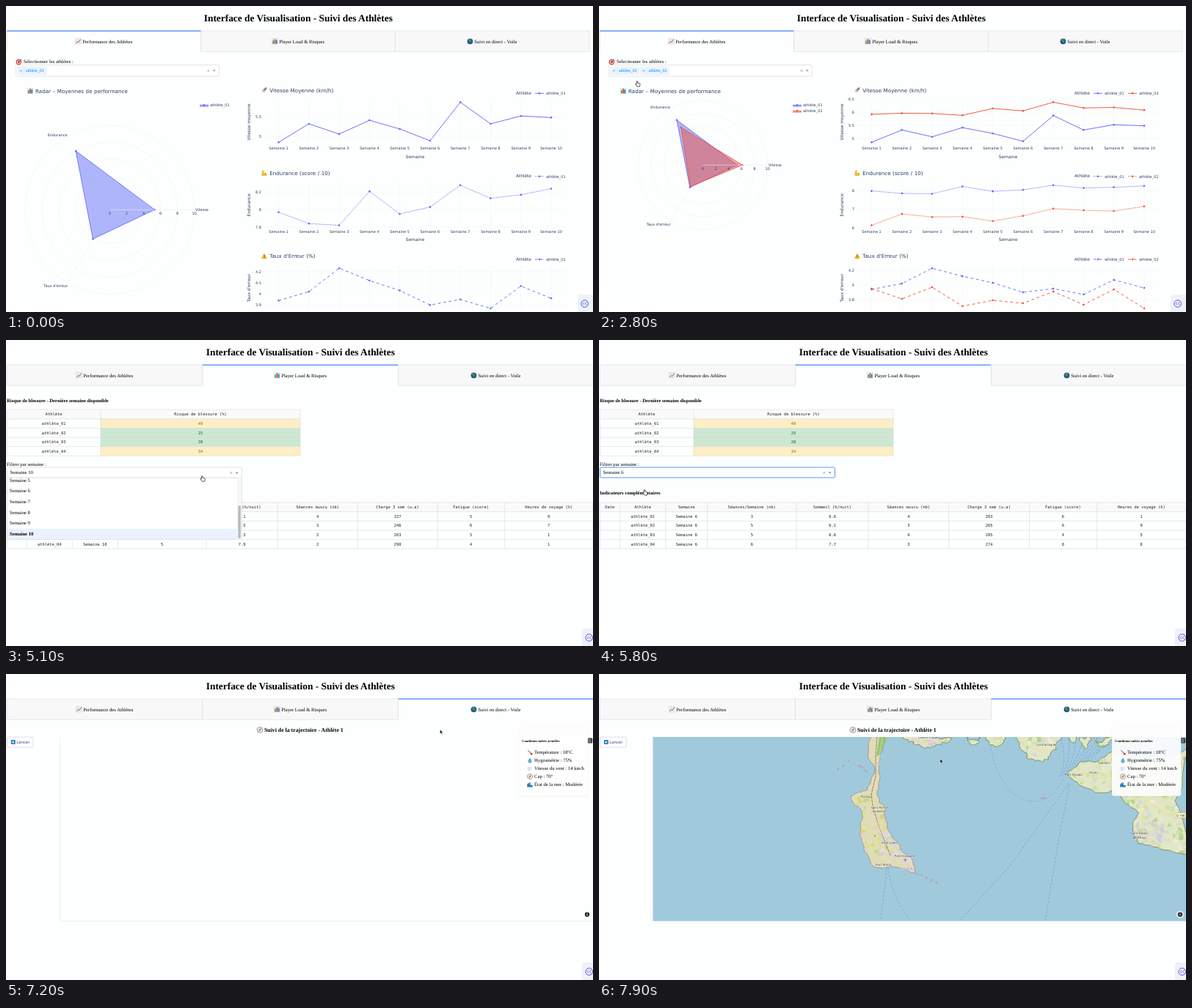
Animation of 800x418 px, one loop 8 s. Source, as an HTML page:

```html
<!DOCTYPE html>
<html lang="fr">
<head>
<meta charset="utf-8">
<title>Suivi des Athlètes</title>
<style>
html,body{margin:0;width:100%;height:100%;overflow:hidden;background:#fdfefe}
svg{display:block;width:100vw;height:100vh}
text{white-space:pre;text-rendering:geometricPrecision}
.s{font:6.667px "Liberation Serif",Times,serif;fill:#000}
.b{font-weight:bold}
.h{font-size:13.38px}
.h3{font-size:7.8px}
.chip{font-size:6px;fill:#007eff}
.tiny{font-size:4.5px}
.p{font:5px "DejaVu Sans",Verdana,sans-serif;fill:#2a3f5f}
.p6{font-size:5.83px}
.p7{font-size:7.15px;word-spacing:.3px}
.m{font:5.42px "DejaVu Sans Mono",Menlo,monospace;fill:#222}
.map{font:4.3px "Noto Sans","Open Sans",sans-serif;fill:#3a3a3a;paint-order:stroke;stroke:#fff;stroke-opacity:.6;stroke-width:.8}
</style>
</head>
<body>
<svg id="stage" viewBox="0 0 800 418" preserveAspectRatio="none"></svg>
<script>
const BLUE = '#636efa', RED = '#ef553b', BG = '#fdfefe', COLORS = [BLUE, RED];
const ANCHOR = { s: 'start', m: 'middle', e: 'end' };

const text = (x, y, s, cls = 's', a = 's', extra = '') =>
  `<text x="${x}" y="${y}" class="${cls}" text-anchor="${ANCHOR[a]}" ${extra}>${s}</text>`;
const rect = (x, y, w, h, fill, extra = '') =>
  `<rect x="${x}" y="${y}" width="${w}" height="${h}" fill="${fill}" ${extra}/>`;
const path = (d, fill = 'none', stroke = 'none', w = 1, extra = '') =>
  `<path d="${d}" fill="${fill}" stroke="${stroke}" stroke-width="${w}" ${extra}/>`;
const circle = (x, y, r, fill, extra = '') =>
  `<circle cx="${x}" cy="${y}" r="${r}" fill="${fill}" ${extra}/>`;
const group = (id, body, extra = '') => `<g id="${id}" ${extra}>${body}</g>`;
const poly = pts => 'M' + pts.map(p => p.map(v => +v.toFixed(2)).join(' ')).join('L');
const stroke = (c, w = .5) => `stroke="${c}" stroke-width="${w}"`;
const times = (n, f) => Array.from({ length: n }, (_, i) => f(i));
const random = seed => () => (seed = seed * 16807 % 2147483647) / 2147483647;

// pictograms in an 8 x 8 box
const ICONS = {
  bars: rect(.2, .3, 7.6, 7.4, '#e9eef2', stroke('#b8c4cc', .4)) + rect(1, 3, 1.7, 4.4, '#3aa655') +
    rect(3.2, 1, 1.7, 6.4, '#d8453e') + rect(5.4, 2.2, 1.7, 5.2, '#2f6fc4'),
  up: rect(.2, .3, 7.6, 7.4, '#eef1f4', stroke('#b8c4cc', .4)) +
    path('M1 3H7M1 5H7M3 1V7M5 1V7', 'none', '#c3d3df', .3) + path('M.8 6.8L3 4.2L4.5 5.2L7.2 1.2', 'none', '#d83c3c', .9),
  globe: circle(4, 4, 3.9, '#1d4f9e') + path('M2 1.2Q5 .2 5.6 1.6L4.6 3L5.6 4L4.4 6.9L3.2 4.6L1.2 3.6Z', '#4f8f45') + path('M6 3L7.6 3.4L6.8 5.6Z', '#4f8f45'),
  target: circle(3.8, 4.2, 3.7, '#c9352f') + circle(3.8, 4.2, 2.6, '#f3e9e4') + circle(3.8, 4.2, 1.6, '#c9352f') +
    path('M3.8 4.2L7.6 .6', 'none', '#444', .8),
  rocket: path('M7.8 .3Q4 .5 2.2 4L4 5.9Q7.6 4 7.8 .3Z', '#8b98a6') + path('M2.4 3.4L.6 4.4L2 4.8ZM4.6 5.6L3.7 7.5L3.2 6Z', '#d43c34') +
    path('M2 5L.4 7.7L3 6Z', '#f6a623') + circle(5.4, 2.7, .8, '#3a6ea8'),
  arm: path('M1.4 .8L3.4 .5L3.7 2L2.6 2.6L3 4.4Q5 2.8 6.8 4.2Q8.2 6 6.8 7.4Q3.4 8.2 .5 7Z', '#f4bd2f', '#d99a1f', .3),
  warn: path('M4 .5L7.8 7.3H.2Z', '#f8c22e', '#e0a21b', .4) + rect(3.6, 2.8, .8, 2.5, '#222') + circle(4, 6.3, .5, '#222'),
  compass: circle(4, 4, 3.6, '#e9e9e7', stroke('#8a8a8a', .7)) + path('M6 1.8L4.6 4.6L3.4 3.4Z', '#d0402f') + path('M2 6.2L4.6 4.6L3.4 3.4Z', '#777'),
  play: rect(.3, .3, 7.4, 7.4, '#3b82c4', 'rx="1"') + path('M2.8 2L6 4L2.8 6Z', '#fff'),
  thermo: path('M1.4 1L6 5.6', 'none', '#c9b9b9', 1.6, 'stroke-linecap="round"') + path('M2.6 2.2L6 5.6', 'none', '#9c3a34', .8) + circle(6.3, 6, 1.3, '#b5342d'),
  drop: path('M4 .3Q7 4 6.6 5.6A2.7 2.7 0 0 1 1.4 5.6Q1 4 4 .3Z', '#5aaee0'),
  wind: path('M.6 3H5Q6.6 3 6 1.6M.6 4.8H6.6M1.6 6.4H4.6', 'none', '#b9c7d4', .8) + circle(1.8, 2.6, 1, '#d7dde6'),
  wave: path('M.2 7.4V3.6Q2.6 -.4 6.2 2.2L4.4 3Q4.4 5 7.8 5V7.4Z', '#2f7fb8') + path('M.6 3.4Q3 .6 6 2.3', 'none', '#bfe0ee', .7)
};
const icon = (name, x, y, k = 1) => `<g transform="translate(${x} ${y}) scale(${k})">${ICONS[name]}</g>`;

function tabs(sel, w) {
  const items = [['up', 'Performance des Athlètes', 39], ['bars', 'Player Load &amp; Risques', 35.7], ['globe', 'Suivi en direct - Voile', 34.2]];
  let out = text(1.4 + w * 1.5, 21, 'Interface de Visualisation - Suivi des Athlètes', 's b h', 'm');
  items.forEach(([ic, label, off], i) => {
    const x = 1.2 + w * i, c = x + w / 2, on = i === sel;
    out += rect(x, 34, w, 28.2, on ? BG : '#f8f8f8', on ? '' : stroke('#d6d6d6'));
    if (on) out += path(`M${x} 34V62M${x + w} 34V62`, 'none', '#d6d6d6', .5) + rect(x, 33.5, w, 1.2, '#3f7dfa');
    out += icon(ic, c - off, 44.3) + text(c - off + 9.8, 51, label);
  });
  return out;
}

function sideButton(x) {
  return path(`M800 394H${x + 3}Q${x} 394 ${x} 397V418H800Z`, '#eff1fa') +
    circle(x + 9.7, 406.6, 4.8, 'none', stroke('#4540d6', .9)) +
    path(`M${x + 9.2} 404.6l-2 2l2 2m3.2 -4l-2 2l2 2`, 'none', '#4540d6', .8);
}

const cross = (x, y, r, c, w = .6) => path(`M${x - r} ${y - r}l${2 * r} ${2 * r}m0 ${-2 * r}l${-2 * r} ${2 * r}`, 'none', c, w);
const caret = (x, y, up) => path(up ? `M${x - 2} ${y + 1}h4l-2 -2.2Z` : `M${x - 2} ${y - 1}h4l-2 2.2Z`, '#888');

function chip(i) {
  const x = 16.4 + 40.5 * i;
  return rect(x, 83.2, 38, 10.4, '#ebf5ff', 'rx=".8" ' + stroke('#c2e0ff', .4)) + path(`M${x + 8} 83.2v10.4`, 'none', '#c2e0ff', .4) +
    cross(x + 4, 88.4, 1.1, '#007eff') + text(x + 10.6, 90.4, 'athlète_0' + (i + 1), 's chip');
}

// performance tab
const CHARTS = [
  { ic: 'rocket', title: 'Vitesse Moyenne (km/h)', yTitle: 'Vitesse moyenne', dash: 0,
    data: [[4.85, 5.32, 5.06, 5.41, 5.19, 4.89, 5.87, 5.32, 5.52, 5.48], [5.92, 5.96, 5.95, 5.88, 6.14, 6.05, 6.38, 6.16, 6.18, 6.08]] },
  { ic: 'arm', title: 'Endurance (score / 10)', yTitle: 'Endurance', dash: 1.25,
    data: [[7.97, 7.84, 7.82, 8.21, 7.95, 8.03, 8.28, 8.13, 8.17, 8.24], [6.12, 6.73, 6.57, 6.59, 6.35, 6.63, 7.02, 6.93, 6.89, 7.14]] },
  { ic: 'warn', title: "Taux d'Erreur (%)", yTitle: "Taux d'erreur", dash: 3.75,
    data: [[3.94, 4.02, 4.23, 4.12, 4.03, 3.9, 3.95, 3.87, 4.07, 3.96], [3.95, 3.81, 3.97, 3.71, 3.79, 3.75, 3.91, 3.73, 3.94, 3.68]] }
];
const weekX = i => 371.5 + 41.28 * i;

function chart(c, row, n) {
  const dy = row * 113.4, all = c.data.slice(0, n).flat();
  const max = Math.max(...all), span = max - Math.min(...all), pad = span * .1;
  const Y = v => 131.4 + dy + (max - v) / span * 54.8;
  const step = [.1, .2, .5, 1].find(s => span / s < 3.8);
  const dash = (c.dash ? `stroke-dasharray="${c.dash}" ` : '') + 'stroke-linejoin="round"';
  let out = icon(c.ic, 348, 110.8 + dy) + text(359.3, 117.6 + dy, c.title, 'p p7');
  for (let i = 0; i < 10; i++) {
    out += path(`M${weekX(i)} ${128 + dy}v60`, 'none', '#eef2f9', .5) + text(weekX(i), 196.4 + dy, 'Semaine ' + (i + 1), 'p', 'm');
  }
  for (let k = Math.ceil((max - span - pad) / step); k * step < max + pad; k++) {
    const v = +(k * step).toFixed(1);
    out += path(`M351 ${Y(v)}H764`, 'none', '#eef2f9', .5) + text(348, Y(v) + 1.9, v, 'p', 'e');
  }
  out += text(557.5, 207.7 + dy, 'Semaine', 'p p6', 'm') +
    text(0, 0, c.yTitle, 'p p6', 'm', `transform="translate(333 ${158.5 + dy}) rotate(-90)"`) +
    text(695 - 47 * (n - 1), 121 + dy, 'Athlète', 'p p6');
  for (let s = 0; s < n; s++) {
    const pts = c.data[s].map((v, i) => [weekX(i), Y(v)]), lx = 736 - 47 * (n - 1 - s), ly = 119.3 + dy;
    out += path(poly(pts), 'none', COLORS[s], .95, dash) + pts.map(p => circle(p[0], p[1], 1.3, COLORS[s])).join('') +
      path(`M${lx - 15} ${ly}h12`, 'none', COLORS[s], .95, dash) + circle(lx - 9, ly, 1.3, COLORS[s]) +
      text(lx, ly + 1.9, 'athlète_0' + (s + 1), 'p');
  }
  return out;
}

function radar(n) {
  const cx = 141.5, [cy, R] = n === 1 ? [278.3, 115.2] : [217.2, 88.2];
  const at = (r, deg) => [cx + r * R / 10 * Math.cos(deg * Math.PI / 180), cy - r * R / 10 * Math.sin(deg * Math.PI / 180)];
  const means = [[5.3, 8.05, 4], [6.1, 6.7, 3.85]];
  let out = icon('bars', 29, 112) + text(40, 118.7, 'Radar – Moyennes de performance', 'p p7');
  for (let r = 2; r <= 10; r += 2) out += circle(cx, cy, r * R / 10, 'none', stroke('#ebf0f8'));
  for (const a of [120, 240]) out += path(poly([[cx, cy], at(10, a)]), 'none', '#ebf0f8', .5);
  for (let s = 0; s < n; s++) {
    const pts = means[s].map((r, i) => at(r, 120 * i)), c = COLORS[s], y = 135.4 + 7.9 * s;
    out += path(poly(pts) + 'Z', c, 'none', 0, 'fill-opacity=".5"') + path(poly(pts) + 'Z', 'none', c, .9) +
      pts.map(p => circle(p[0], p[1], 1.3, c)).join('') +
      rect(264, y, 12, 2.6, c, 'opacity=".5"') + path(`M264 ${y}h12`, 'none', c, .9) + circle(270, y, 1.3, c) +
      text(278, y + 1.8, 'athlète_0' + (s + 1), 'p');
  }
  out += path(`M${cx} ${cy}h${R}`, 'none', '#e3e9f3', .6);
  for (let r = 0; r <= 10; r += 2) out += text(cx + r * R / 10, cy + 6.3, r, 'p', 'm');
  return out + text(cx + R + 1.2, cy + 1.8, 'Vitesse', 'p') +
    text(cx - R / 2 - .4, cy - R * .866 - .8, 'Endurance', 'p', 'e') +
    text(cx - R / 2 + .2, cy + R * .866 + 6.2, "Taux d'erreur", 'p', 'e');
}

const dashboard = n => radar(n) + CHARTS.map((c, i) => chart(c, i, n)).join('');

const athletePicker = icon('target', 13.5, 72.3) + text(24, 78.3, 'Sélectionner les athlètes :') +
  rect(13.7, 80.6, 276.6, 15.4, '#fff', 'rx="1.5" ' + stroke('#c8c8c8')) + chip(0) + group('chip2', chip(1)) +
  cross(276, 88.4, 1.5, '#888') + group('down1', caret(283.7, 88.4)) + group('up1', caret(283.7, 88.4, true));

const athleteMenu = rect(13.7, 96, 461, 44, '#fff', stroke('#ccc')) + rect(14, 96.2, 460.4, 14.4, '#ebf1fd') +
  times(3, i => text(17.8, 105.4 + 14.7 * i, 'athlète_0' + (i + 2))).join('');

// load and risk tab
function table(xs, y, head, rows, fills = []) {
  const h = 12.6, w = xs[xs.length - 1] - xs[0];
  let out = rect(xs[0], y, w, h, '#fafafa');
  [head, ...rows].forEach((cells, r) => {
    if (fills[r - 1]) out += rect(xs[1], y + r * h, xs[2] - xs[1], h, fills[r - 1][0]);
    cells.forEach((s, i) => {
      const tint = r && i && fills[r - 1] ? `style="fill:${fills[r - 1][1]}"` : '';
      out += text((xs[i] + xs[i + 1]) / 2, y + r * h + 8.1, s, 'm', 'm', tint);
    });
  });
  for (let r = 0; r <= rows.length + 1; r++) out += path(`M${xs[0]} ${y + r * h}h${w}`, 'none', '#d3d3d3', .5);
  return out + xs.map(x => path(`M${x} ${y}v${h * (rows.length + 1)}`, 'none', '#d3d3d3', .5)).join('');
}

const AMBER = ['#fdeec5', '#8a6a14'], GREEN = ['#cce8d2', '#1f5c31'];
const risks = text(1, 84.5, 'Risque de blessure - Dernière semaine disponible', 's b') +
  table([1.3, 129, 401], 95.2, ['Athlète', 'Risque de blessure (%)'],
    [49, 25, 28, 34].map((v, i) => ['athlète_0' + (i + 1), v]), [AMBER, GREEN, GREEN, AMBER]);

function indicators(week, rows) {
  const head = ['Date', 'Athlète', 'Semaine', 'Séances/Semaine (nb)', 'Sommeil (h/nuit)', 'Séances muscu (nb)', 'Charge 3 sem (u.a)', 'Fatigue (score)', 'Heures de voyage (h)'];
  const body = rows.map((r, i) => ['', 'athlète_0' + (i + 1), 'Semaine ' + week, ...r.split(' ')]);
  // column widths follow the longest cell
  const sizes = head.map((s, i) => Math.max(s.length, body[0][i].length) + .6);
  const k = 798.7 / sizes.reduce((a, b) => a + b), xs = [1.3];
  sizes.forEach(n => xs.push(xs[xs.length - 1] + n * k));
  return text(1, 211.3, 'Indicateurs complémentaires', 's b') + table(xs, 222, head, body);
}
const picker = week => text(5.6, 183.3, 'Semaine ' + week);
const week10 = indicators(10, ['4 6.1 4 327 5 9', '3 7.5 3 246 6 7', '6 6.3 2 203 5 1', '5 7.9 2 298 4 1']);
const week6 = indicators(6, ['3 6.6 4 203 6 1', '5 6.1 3 265 6 9', '5 6.6 4 285 4 5', '6 7.7 3 274 8 8']);

const weekPicker = text(1, 172, 'Filtrer par semaine :') +
  rect(1.5, 174, 320, 14, '#fff', 'id="box2" rx="1.5" ' + stroke('#c8c8c8')) +
  cross(306.8, 181.4, 1.5, '#888') + group('down2', caret(314.7, 181.2)) + group('up2', caret(314.7, 181.2, true)) +
  group('pick10', picker(10)) + group('pick6', picker(6));

const weekMenu = rect(1.5, 188.2, 320, 84.3, '#fff', stroke('#ccc')) + rect(1.8, 257.8, 313, 14.4, '#ebf1fd') +
  rect(1.8, 199.2, 313, 14.4, '#ebf1fd', 'id="hover6"') +
  times(6, i => text(5, 193.8 + 14.66 * i, 'Semaine ' + (i + 5), i === 5 ? 's b' : 's')).join('') +
  rect(315, 188.5, 6.2, 83.8, '#f6f6f6') + rect(316.4, 226, 3.4, 45, '#b9b9b9', 'rx="1.7"');

// live map tab
const rnd = random(11);

// closed outline through key points, roughened by midpoint displacement
function coast(pts, rough = .3, levels = 3) {
  for (let l = 0; l < levels; l++) {
    pts = pts.flatMap(([x, y], i) => {
      const [x2, y2] = pts[(i + 1) % pts.length], k = (rnd() - .5) * rough;
      return [[x, y], [(x + x2) / 2 + (y2 - y) * k, (y + y2) / 2 - (x2 - x) * k]];
    });
  }
  return poly(pts) + 'Z';
}
const keys = s => s.split(' ').map(p => p.split(',').map(Number));
// land hanging from the upper edge of the map
const bay = ([x, w, depth]) => coast(times(9, i => [x + w * i / 8, 85 + depth * Math.sin(Math.PI * i / 8) ** .6]), .8, 2);

const QUIBERON = coast(keys('373,84 376,130 366,158 343,167 355,183 357,210 361,240 376,264 406,264 431,271 428,256 411,240 393,205 379,165 381,130 386,105 398,84'), .32);
const RHUYS = coast(keys('637,137 656,120 700,106 806,98 806,248 765,239 735,232 727,205 735,189 700,159 655,152'), .3);
const NORTH = [[414, 70, 15], [500, 20, 12], [529, 26, 14], [567, 64, 33], [640, 12, 9], [657, 12, 17], [674, 24, 14], [702, 30, 10]].map(bay).join('');

function fields(x, y, w, h, n, tones) {
  return times(n, () => {
    const cx = x + rnd() * w, cy = y + rnd() * h;
    return path(coast(times(4, i => {
      const a = i * Math.PI / 2 + rnd(), r = 1.5 + rnd() * 4;
      return [cx + r * Math.cos(a), cy + r * Math.sin(a)];
    }), .5, 1), tones[Math.floor(rnd() * tones.length)]);
  }).join('');
}
const TOWN = ['#d9d5d8', '#d2cfd4', '#e2dcdc'], MEADOW = ['#cfe0a8', '#b4d58f', '#e3e8c6', '#d8e3b4', '#dad7d6', '#eeebd6'], HEATH = ['#dbe08f', '#c6d888', '#e9dfa0', '#d9d5d8', '#e3d3b8'];

const ferry = (d, o = 1) => path(d, 'none', '#7c8ee0', .7, `stroke-dasharray="3 2" opacity="${o}"`);
const LABELS = [[448, 88, 'Carnac-Plage'], [363.5, 169, 'Portivy'], [382, 184, 'Saint Pierre'], [382, 189.3, 'Quiberon'], [396, 232, 'Saint Julien'],
  [416.5, 250.3, 'Port Haliguen'], [387.5, 261.8, 'Port Maria'], [610, 97.8, 'Locmariaquer'], [689, 123, 'Kerners'], [674, 136, 'Arzon'],
  [647, 139, 'Port-Navalo'], [737, 219, 'Saint-Gildas-'], [737, 224.5, 'de-Rhuys']];
// small rocks strung between two points
const rocks = (x, y, dx, dy, n) => times(n, i =>
  circle(x + dx * i / (n - 1), y + dy * i / (n - 1) + rnd() * 2, .8 + rnd(), '#c3b3b4', stroke('#a5849a', .4))).join('');

// tiles fade in, the nearest to the centre of the map first
const TILE = 107.6, COLS = 8;
const tileDelay = (c, r) => Math.min(13, .5 * (c - 3.3) ** 4 * (r > 1 ? 6 : 1));
const tileX = c => Math.round(18 + TILE * c), tileY = r => Math.round(82 + TILE * r);
const tileRects = times(3 * COLS, i => {
  const c = i % COLS, r = Math.floor(i / COLS);
  return rect(tileX(c), tileY(r), tileX(c + 1) - tileX(c), tileY(r + 1) - tileY(r), BG,
    `class="tile" shape-rendering="crispEdges" data-d="${tileDelay(c, r)}"`);
}).join('');

const channels = times(9, i => `M${627 + 3 * i} ${140 - i}Q${640 + 5 * i} ${118 - 2 * i} ${628 + 11 * i} 84`).join('');
const map = `<clipPath id="frame">${rect(73.5, 86, 726.5, 251.5, '#000')}</clipPath>
<clipPath id="land">${path(QUIBERON) + path(RHUYS) + path(NORTH)}</clipPath>` +
  group('map', rect(73, 86, 727, 252, '#a0cadb') +
    ferry('M393 262L384 337M394 264Q398 302 424 337') + ferry('M640 150L560 262L492 337M641 152L625 235L608 337') +
    ferry('M533 92Q537 132 560 160Q600 192 628 152L633 142', .8) + ferry(channels) +
    path(QUIBERON, '#e0ddb4') + path(RHUYS + NORTH, '#e1e6c6') +
    `<g clip-path="url(#land)">${fields(342, 162, 50, 88, 110, HEATH) + fields(384, 212, 46, 56, 70, TOWN) +
      fields(636, 100, 164, 146, 330, MEADOW) + fields(725, 200, 45, 30, 40, TOWN) + fields(412, 85, 300, 36, 200, MEADOW) + fields(420, 86, 60, 12, 30, TOWN)}` +
    path('M382 86L378 112L384 110L392 84V86Z', '#94c873') +
    path('M640 138L674 134L705 143L745 172L775 192H800M745 172L738 215L765 238M700 142L712 110', 'none', '#f1dc8a', 1.1) +
    path('M577 92L600 104L618 108M420 90L450 94L478 88', 'none', '#f4e3a6', .9) + '</g>' +
    path(QUIBERON, 'none', '#a5849a', .8) + path(RHUYS + NORTH, 'none', '#6b8352', .8) +
    path('M379 86L377 112L377 140L371 165L374 185L383 212L397 248', 'none', '#665c66', .7, 'stroke-dasharray="4 .8"') +
    path('M386 86L379 135L375 168L380 200L390 240L388 262', 'none', '#f0d9a0', .7) +
    rocks(433, 272, 27, 11, 5) + rocks(326, 130, 14, -12, 3) + rocks(355, 124, 10, 8, 4) + rocks(603, 169, 4, -1, 3) +
    circle(376, 221, 1.1, '#d77a3c') + path('M417.5 251.5v5M415 254h5', 'none', '#a44bb5', .8) +
    LABELS.map(([x, y, s]) => text(x, y, s, 'map', 'm')).join('') + text(418, 267, 'Bretagne', 'map', 'm', 'style="fill:#8d72a8"') +
    rect(785, 189.6, 15, 7, '#f7f2c4', 'rx="1" ' + stroke('#a99a4a', .4)) + text(792.5, 194.8, 'D 198', 'map', 'm') + tileRects,
    'clip-path="url(#frame)"');

const WEATHER = [['thermo', 'Température : 18°C'], ['drop', 'Hygrométrie : 75%'], ['wind', 'Vitesse du vent : 14 km/h'], ['compass', 'Cap : 70°'], ['wave', 'État de la mer : Modérée']];
const live = icon('compass', 341.6, 72, 1.1) + text(352, 79, 'Suivi de la trajectoire - Athlète 1', 's b h3') +
  rect(1.5, 86.2, 35.5, 13.8, '#fff', 'rx="1" ' + stroke('#b9bde0')) + icon('play', 6.5, 89.8, .82) +
  text(14.2, 95, 'Lancer', 'p', 's', 'style="font-size:5.4px;fill:#35408f"') + map +
  rect(792.4, 87.6, 6.8, 7, '#333', 'rx="1"') + path('M794 89.4h3.6M794 91.1h3.6M794 92.8h3.6', 'none', '#ddd', .6) +
  circle(792, 328.5, 5, '#fff', 'opacity=".75"') + circle(792, 328.5, 3.2, '#2b2b2b') + path('M792 328v2.2M792 326.4v.8', 'none', '#fff', .9) +
  rect(698.2, 73.6, 95.8, 94.4, '#000', 'rx="4" opacity=".035"') + rect(699, 74, 94.3, 92.8, '#fff', 'rx="3.5" opacity=".9"') +
  text(703.2, 93.3, 'Conditions météo actuelles', 's b tiny') +
  WEATHER.map(([ic, s], i) => icon(ic, 710, 103.2 + 10.95 * i) + text(720, 109.3 + 10.95 * i, s)).join('');

const hand = path('M-.8 1q.8-1.2 1.6 0V3l2.4.6q1 .3.8 1.3L3.4 8H0L-2.2 5q-.3-1 .6-.9l.8.7Z', '#fff', '#111', .7);
const arrow = path('M0 0V5.6L1.3 4.4L2.2 6.6L3.2 6.2L2.3 4.1H4Z', '#111', '#fff', .4);

const stage = document.getElementById('stage');
stage.innerHTML = rect(0, 0, 800, 418, BG) +
  group('perf', group('one', dashboard(1)) + group('two', dashboard(2)) + athletePicker + group('menu1', athleteMenu) + tabs(0, 264.6) + sideButton(779)) +
  group('load', tabs(1, 266.6) + risks + group('w10', week10) + group('w6', week6) + weekPicker + group('menu2', weekMenu)) +
  group('live', tabs(2, 266.6) + live) + group('side', sideButton(785)) +
  group('cursor', group('hand', hand) + group('arrow', arrow));

const $ = id => document.getElementById(id);
const show = (id, on) => $(id).setAttribute('display', on ? 'inline' : 'none');
const tiles = [...stage.querySelectorAll('.tile')];

// cursor stops: arrival time, x, y; it rests, then glides to the next one
const STOPS = [[500, 240, 2], [1200, 60, 88], [1800, 52, 102], [3600, 391, 45], [4800, 318, 180.5], [5600, 62, 204],
  [6600, 593.5, 58], [6900, 655, 46], [7500, 528, 106], [7900, 465, 116]];
const GLIDE = 700;

function cursorAt(t) {
  const i = Math.max(1, STOPS.findIndex(k => k[0] >= t));
  const [t0, x0, y0] = STOPS[i - 1], [t1, x1, y1] = STOPS[i], d = Math.min(GLIDE, t1 - t0);
  const u = Math.max(0, (t - t1 + d) / d), e = u * u * (3 - 2 * u);
  return [x0 + (x1 - x0) * e, y0 + (y1 - y0) * e];
}

function render(time) {
  const t = Math.floor(time / 100) * 100;
  const tab = t < 4000 ? 0 : t < 7000 ? 1 : 2;
  const open1 = t >= 1300 && t < 2000, open2 = t >= 4900 && t < 5700, picked = t >= 5700;
  show('perf', tab === 0); show('load', tab === 1); show('live', tab === 2); show('side', tab > 0);
  show('one', t < 2200); show('two', t >= 2200); show('chip2', t >= 2000);
  show('menu1', open1); show('up1', open1); show('down1', !open1);
  show('menu2', open2); show('up2', open2); show('down2', !open2); show('hover6', t >= 5500);
  show('pick10', !picked); show('pick6', picked); show('w10', t < 5800); show('w6', t >= 5800);
  $('box2').setAttribute('stroke', picked ? '#4a8fe0' : '#c8c8c8');
  $('box2').setAttribute('stroke-width', picked ? .9 : .5);
  for (const el of tiles) {
    const u = (t - 7200 - el.dataset.d * 30) / 300;
    el.setAttribute('opacity', 1 - Math.max(0, Math.min(1, u)));
  }
  const [x, y] = cursorAt(t);
  const onLink = y > 34 && y < 62 || tab === 0 && x < 290 && y > 80 && y < 140 ||
    tab === 1 && x < 321 && y > 174 && y < 272;
  show('cursor', t >= 500); show('hand', onLink); show('arrow', !onLink);
  $('cursor').setAttribute('transform', `translate(${x.toFixed(2)} ${y.toFixed(2)})`);
}

const start = performance.now();
function tick() {
  render((performance.now() - start) % 8000);
  requestAnimationFrame(tick);
}
render(0);
tick();
</script>
</body>
</html>
```
